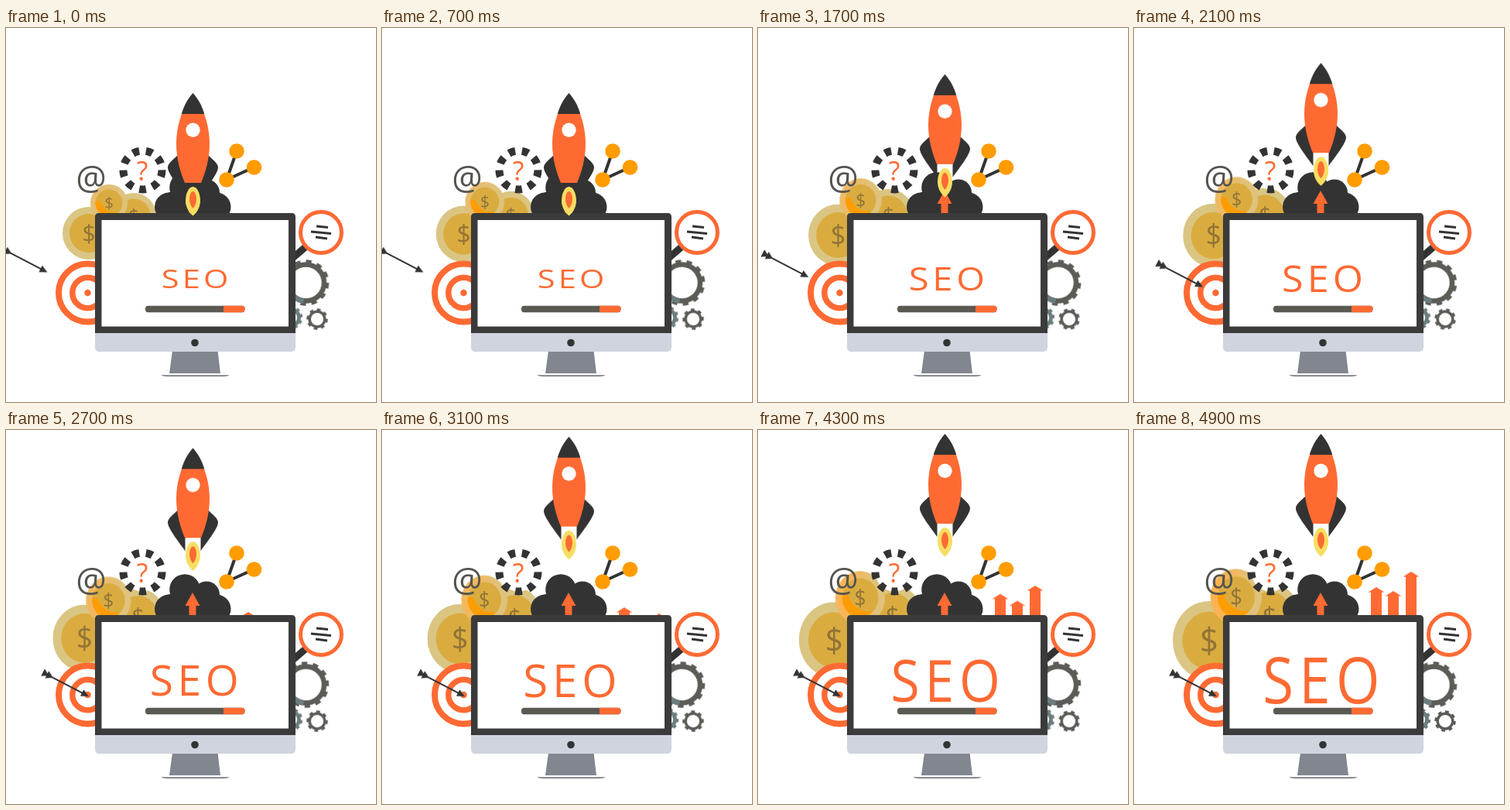
Animation of 478x483 px, one loop 5 s. Source, as an HTML page:

```html
<!DOCTYPE html>
<html lang="en">
<head>
<meta charset="utf-8">
<title>SEO launch</title>
<style>
  html, body { margin: 0; width: 100%; height: 100%; overflow: hidden; background: #fff; }
  svg { display: block; width: 100%; height: 100%; }
  text { font-family: "Open Sans", "Noto Sans", sans-serif; }
  .orange { fill: #ff6a33; }
  .dark { fill: #333; }
  .amber { fill: #ff9c00; }
  .ring { fill: #fff; stroke: #ff6a33; }
  .line { fill: none; stroke: #333; }

  .rocket, .dart, .word, .coin, .bar, .gear, .glow { animation: 5s linear infinite; }

  .rocket { animation-name: launch; }
  @keyframes launch {
    0% { transform: translateY(84px); }
    20% { transform: translateY(84px); animation-timing-function: steps(1, end); }
    22% { transform: translateY(81.8px); animation-timing-function: steps(21, end); }
    64%, 100% { transform: translateY(5px); }
  }

  .dart { animation-name: shoot; }
  @keyframes shoot {
    0% { transform: translate(53.5px, 315.5px); }
    30% { transform: translate(53.5px, 315.5px); animation-timing-function: steps(9, end); }
    48%, 100% { transform: translate(107px, 344px); }
  }

  .word { animation-name: swell; }
  @keyframes swell {
    0% { transform: translate(203px, 324px) scale(.832, .66); }
    20% { transform: translate(203px, 324px) scale(.832, .66); animation-timing-function: steps(40, end); }
    100% { transform: translate(169.2px, 324px) scale(1.467, 1.66); }
  }

  .coin { animation-name: grow; animation-timing-function: steps(50, end); }
  .coin text { fill: #927436; text-anchor: middle; }
  @keyframes grow {
    from { transform: translate(var(--a)) scale(1, 1); }
    to { transform: translate(var(--b)) scale(1.388, 1.51); }
  }
  .glow { animation-name: warm; animation-timing-function: steps(50, end); }
  @keyframes warm { from { opacity: .2; } to { opacity: .95; } }

  .bar { animation-name: var(--rise); }
  @keyframes rise1 {
    0% { transform: translateY(246px); }
    48% { transform: translateY(239.3px); animation-timing-function: steps(26, end); }
    100% { transform: translateY(201.5px); }
  }
  @keyframes rise2 {
    0% { transform: translateY(246px); }
    68% { transform: translateY(239.4px); animation-timing-function: steps(16, end); }
    100% { transform: translateY(205.8px); }
  }
  @keyframes rise3 {
    0% { transform: translateY(246px); }
    60% { transform: translateY(240px); animation-timing-function: steps(20, end); }
    100% { transform: translateY(180px); }
  }

  .gear { fill: none; stroke: #5b5c56; animation-name: spin; animation-timing-function: steps(50, end); }
  .back { animation-direction: reverse; }
  @keyframes spin { to { transform: rotate(90deg); } }
</style>
</head>
<body>
<svg viewBox="0 0 478 483" preserveAspectRatio="none">
  <defs>
    <linearGradient id="warmth">
      <stop offset=".3" stop-color="#ffb24f"/>
      <stop offset=".75" stop-color="#ffb24f" stop-opacity="0"/>
    </linearGradient>
    <path id="arrowBar" class="orange" d="M0 0L10.5 6.500H7V70H-7V6.500H-10.500Z"/>
  </defs>

  <!-- coins -->
  <g class="coin" style="--a:165px,242px;--b:175.2px,241px">
    <circle r="29" fill="#dac583"/>
    <circle r="21.500" fill="#daac40"/>
    <text y="8.500" font-size="24">$</text>
  </g>
  <g class="coin" style="--a:107px,265px;--b:96.8px,272.1px">
    <circle r="34" fill="#dac583"/>
    <circle r="25" fill="#daac40"/>
    <text y="11" font-size="31">$</text>
  </g>
  <g class="coin" style="--a:133px,226px;--b:132px,215.300px">
    <circle r="24" fill="#dfc27b"/>
    <circle class="glow" r="24" fill="url(#warmth)"/>
    <circle r="17.500" fill="#daac40"/>
    <path class="amber" d="M-17.400-2A17.500 17.500 0 0 0 12 12.700C6 11 2 13-3 9C-8 6-10 2-12-3Z"/>
    <text y="7.200" font-size="20.500">$</text>
  </g>

  <text x="110" y="208.500" font-size="44" fill="#55554f" text-anchor="middle">@</text>

  <!-- question badge -->
  <circle cx="176.500" cy="183.500" r="25" fill="#fff" stroke="#333" stroke-width="10"
    pathLength="18" stroke-dasharray="1 1" transform="rotate(80 176.500 183.500)"/>
  <text class="orange" x="176" y="196.500" font-size="34" text-anchor="middle">?</text>

  <!-- network -->
  <path class="line" stroke-width="4" d="M298 159L285 196L320 180"/>
  <g class="amber">
    <circle cx="298" cy="159" r="9.800"/>
    <circle cx="320.500" cy="180" r="9.800"/>
    <circle cx="285" cy="196" r="9.800"/>
  </g>

  <!-- bars -->
  <g transform="translate(313)"><use href="#arrowBar" class="bar" style="--rise:rise1"/></g>
  <g transform="translate(335)"><use href="#arrowBar" class="bar" style="--rise:rise2"/></g>
  <g transform="translate(358)"><use href="#arrowBar" class="bar" style="--rise:rise3"/></g>

  <!-- cloud -->
  <g class="dark">
    <circle cx="210.500" cy="231" r="18.500"/>
    <circle cx="231" cy="206" r="19.800"/>
    <circle cx="259" cy="212.500" r="17"/>
    <circle cx="272" cy="231" r="18.500"/>
    <path d="M210 212H270V242H210Z"/>
  </g>
  <path class="orange" d="M241 210L250.500 227H245.500V242H236.500V227H231.500Z"/>

  <!-- target -->
  <g transform="translate(105.500 342)">
    <circle class="ring" r="37.500" stroke-width="8"/>
    <circle class="ring" r="19.700" stroke-width="7.500"/>
    <circle class="orange" r="4.300"/>
  </g>

  <!-- gears -->
  <g transform="translate(368 374)">
    <g class="gear back" style="stroke:#6c7d7d">
      <circle r="10.500" stroke-width="5"/>
      <circle r="13.500" stroke-width="3.500" pathLength="20" stroke-dasharray="1 1"/>
    </g>
  </g>
  <g transform="translate(387.500 329)">
    <g class="gear">
      <circle r="23.500" stroke-width="6.500"/>
      <circle r="27.800" stroke-width="4" pathLength="24" stroke-dasharray="1 1"/>
    </g>
    <path d="M-3 23.500A23.500 23.500 0 0 1-19 14" fill="none" stroke="#6c7d7d" stroke-width="6.500"/>
  </g>
  <g transform="translate(402 376)">
    <g class="gear back">
      <circle r="9.800" stroke-width="3.400"/>
      <circle r="12.200" stroke-width="3.200" pathLength="16" stroke-dasharray="1 1"/>
    </g>
  </g>

  <!-- magnifier -->
  <path class="line" stroke-width="9" d="M389 281L368 299"/>
  <circle class="ring" cx="407" cy="264" r="26.500" stroke-width="5"/>
  <path class="line" stroke-width="3" d="M401 256L416 257.500M394 263L420 265.500M400 270L415 272"/>

  <!-- monitor -->
  <path fill="#82868f" d="M215 417H273.500L277 446H211Z"/>
  <path fill="#8d9095" d="M200 448H289Q286 450.300 281 450.300H208Q203 450.300 200 448Z"/>
  <path fill="#cfd4de" d="M115 392H374V412Q374 418 368 418H121Q115 418 115 412Z"/>
  <path fill="#3b3b3b" d="M115 394V244Q115 239 120 239H369Q374 239 374 244V394Z"/>
  <path fill="#fff" d="M123.500 248H365V385.500H123.500Z"/>
  <circle class="dark" cx="244" cy="406.500" r="4.800"/>
  <rect x="180" y="358.800" width="128.500" height="8.400" rx="3.600" fill="#5a5a52"/>
  <path class="orange" d="M281 358.800H304.900A3.600 3.600 0 0 1 308.500 362.400V363.600A3.600 3.600 0 0 1 304.900 367.200H281Z"/>
  <g class="word">
    <text class="orange" x="-2.600" y="17.900" font-size="50" letter-spacing="5">SEO</text>
  </g>

  <!-- dart -->
  <g class="dart">
    <g class="dark" transform="rotate(27.500)">
      <path class="line" stroke-width="2.200" d="M-60 0H-6"/>
      <path d="M0 0L-10-4.800V4.800ZM-52 0L-61-5.200V5.200ZM-58 0L-67-5.200V5.200Z"/>
    </g>
  </g>

  <!-- rocket -->
  <g class="rocket">
    <path class="dark" d="M222 80C215 87 209 91 209 96C209 104 224 122 231.500 133V112H251.500V133C259 122 274 104 274 96C274 91 268 87 261 80Z"/>
    <path class="orange" d="M227 27H256C260 38 263 51 263 66C263 84 258 102 252 116H231C225 102 220 84 220 66C220 51 223 38 227 27Z"/>
    <path class="dark" d="M241.500 0C248 7 253 16 256.300 27H226.700C230 16 235 7 241.500 0Z"/>
    <circle cx="241.500" cy="47.700" r="9.200" fill="#fff"/>
    <path fill="#f6de62" d="M241.500 121C247 121 251 130 251 139C251 148 246 155 241.500 158.500C237 155 232 148 232 139C232 130 236 121 241.500 121Z"/>
    <path class="orange" d="M241.500 127C244 127 246 132 246 137C246 142 243.500 147 241.500 149C239.500 147 237 142 237 137C237 132 239 127 241.500 127Z"/>
  </g>
</svg>
</body>
</html>
```
